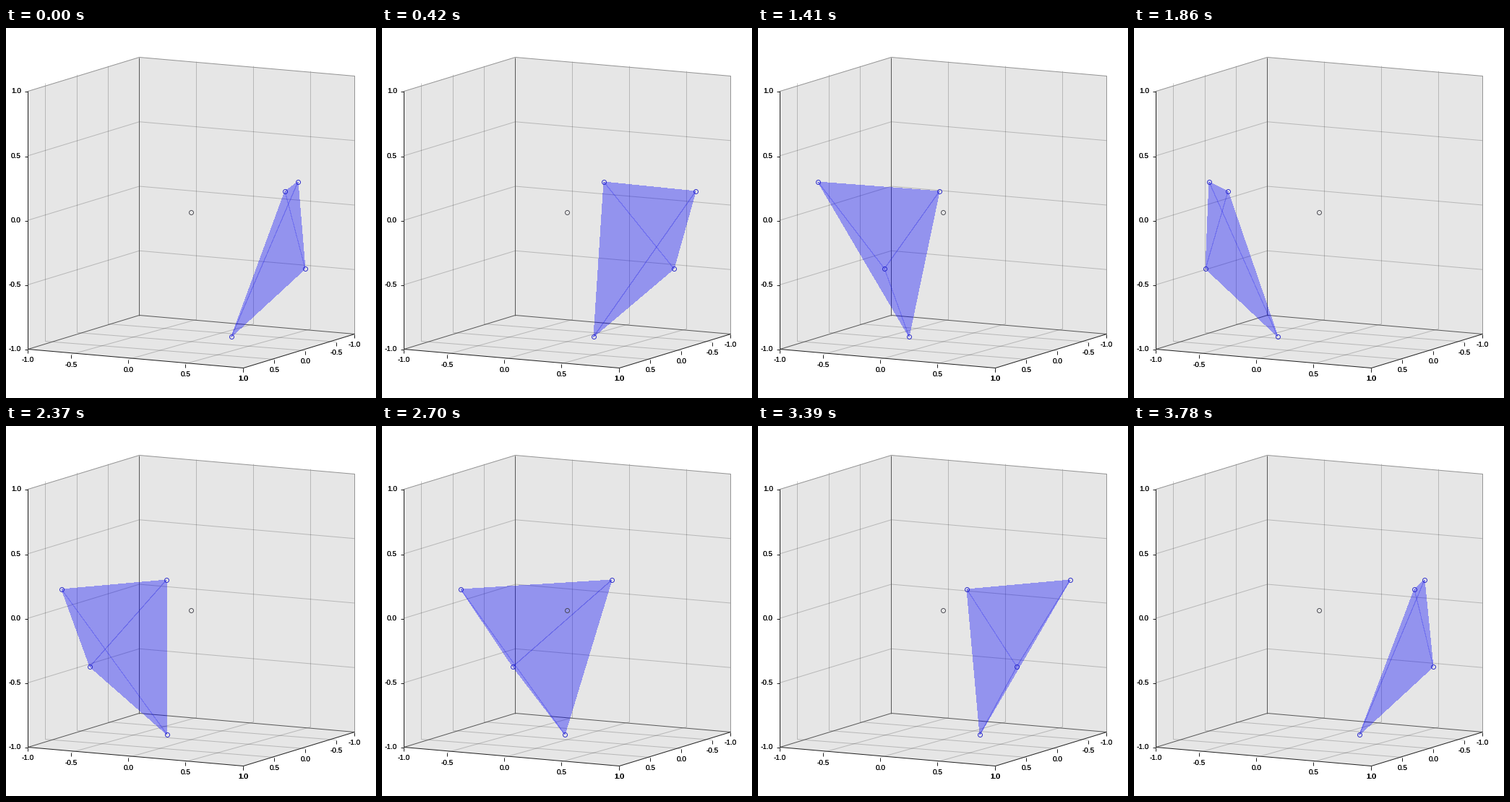
Animation of 512x512 px, one loop 3.81 s. Source, as a matplotlib script:

```python
import numpy as np
import matplotlib.pyplot as plt
from itertools import combinations
from matplotlib.animation import FuncAnimation
from matplotlib.patches import Polygon

SIZE, DPI = 512, 100
FRAMES, INTERVAL = 127, 30
PX = 72 / DPI                     # one pixel in points
STEP = 0.05                       # radians turned per frame

# Tetrahedron on a sphere that turns about the vertical axis
CENTER_X, CENTER_Y, RADIUS = 255.6, 255, 181.3
VERT_Y = np.array([213, 226, 333, 427])
VERT_PHASE = np.radians([-32.8, 43.1, 15, -9.3])
ORBIT = np.sqrt(RADIUS**2 - (VERT_Y - CENTER_Y) ** 2)

# Floor corners of the plot box and its height
LEFT, BACK, RIGHT, FRONT = np.array([(30, 444), (184, 397),
                                     (482, 423), (328, 470)])
HEIGHT = 357
UP = np.array([0, -HEIGHT])

# Screen vectors for half a unit along the two floor axes
U = np.array([79.1, 6.2])
V = np.array([-43.2, 12.05])

plt.rcParams["text.hinting"] = "none"
fig = plt.figure(figsize=(SIZE / DPI, SIZE / DPI), dpi=DPI, facecolor="white")
ax = fig.add_axes([0, 0, 1, 1])
# whole numbers fall just short of pixel centres, so lines snap evenly
ax.set_xlim(-0.49, SIZE - 0.49)
ax.set_ylim(SIZE - 0.51, -0.51)
ax.axis("off")


def floor_point(i, j):
    return np.round(BACK + i * U + j * V)


def line(*pts, color="#202020", alpha=1.0, z=3):
    x, y = zip(*pts)
    ax.plot(x, y, color=color, alpha=alpha, lw=PX, zorder=z,
            solid_capstyle="butt")


def grid(*pts):
    line(*pts, color="black", alpha=0.2, z=1)


def label(x, y, value, align="center"):
    # drawn twice for a slightly heavier stroke
    for _ in range(2):
        ax.text(x, y, f"{value:.1f}", ha=align, va="center_baseline",
                family="Liberation Sans", size=10 * PX)


def floor_ticks(points, values):
    for (x, y), value in zip(points, values):
        line((x, y), (x, y + 5))
        label(x, y + 15, value)


def draw_box():
    outline = [LEFT + UP, BACK + UP, RIGHT + UP, RIGHT, FRONT, LEFT]
    ax.add_patch(Polygon(outline, fc="#e6e6e6", ec="none", zorder=0))

    for k in (1, 2, 3):
        lift = UP * k / 4
        grid(LEFT + lift, BACK + lift, RIGHT + lift)
        for foot, end in ((floor_point(k, 0), floor_point(k, 4)),
                          (floor_point(0, k), floor_point(4, k))):
            grid(foot + UP, foot, end)

    line(LEFT + UP, BACK + UP, RIGHT + UP, RIGHT, color="#949494", z=2)
    line(BACK + UP, BACK, color="#585858", z=2)
    line(LEFT, BACK, RIGHT, color="#585858", z=2)
    line(LEFT + UP, LEFT, FRONT, RIGHT)


def draw_ticks():
    values = np.linspace(-1, 1, 5)
    for value in values:
        y = LEFT[1] - HEIGHT + np.ceil(HEIGHT * (1 - value) / 2)
        line((26, y), (30, y))
        label(20.5, y, value, "right")
    floor_ticks([LEFT] + [floor_point(k, 4) for k in (1, 2, 3, 4)], values)
    floor_ticks([RIGHT] + [floor_point(4, k) for k in (1, 2, 3, 4)], values)


def ring(color, z):
    return ax.plot([], [], "o", ms=6 * PX, mfc="none", mec=color,
                   mew=0.9 * PX, zorder=z)[0]


draw_box()
draw_ticks()
ring("#404048", 6).set_data([255.5], [254.5])

FACES = list(combinations(range(4), 3))
EDGES = list(combinations(range(4), 2))
faces = [ax.add_patch(Polygon(np.zeros((3, 2)), fc=(0, 0, 1, 0.2), ec="none",
                              antialiased=False, zorder=4)) for _ in FACES]
seams = [ax.plot([], [], color="#1010a0", lw=PX, zorder=5)[0] for _ in EDGES]
dots = ring("#2020c8", 7)


def side(p, a, b):
    return (b[0] - a[0]) * (p[1] - a[1]) - (b[1] - a[1]) * (p[0] - a[0])


def update(i):
    x = CENTER_X + ORBIT * np.cos(STEP * i - VERT_PHASE)
    # vertices sit on pixel corners
    pts = np.column_stack([np.round(x), VERT_Y]) - 0.5

    for patch, face in zip(faces, FACES):
        patch.set_xy(pts[list(face)])

    for seam, (m, n) in zip(seams, EDGES):
        a, b = pts[m], pts[n]
        p, q = (pts[j] for j in range(4) if j not in (m, n))
        # an edge lies inside the silhouette if the others are on both sides
        inner = side(p, a, b) * side(q, a, b) < 0
        lean = np.clip((a[0] - b[0]) / (b[1] - a[1]), 0, 1)
        seam.set_data([a[0], b[0]], [a[1], b[1]])
        seam.set_alpha(0.03 + 0.11 * lean)
        seam.set_visible(bool(inner))

    dots.set_data(pts[:, 0], pts[:, 1])
    return [*faces, *seams, dots]


anim = FuncAnimation(fig, update, frames=FRAMES, interval=INTERVAL,
                     repeat=True, repeat_delay=0, blit=False)
plt.show()
```
